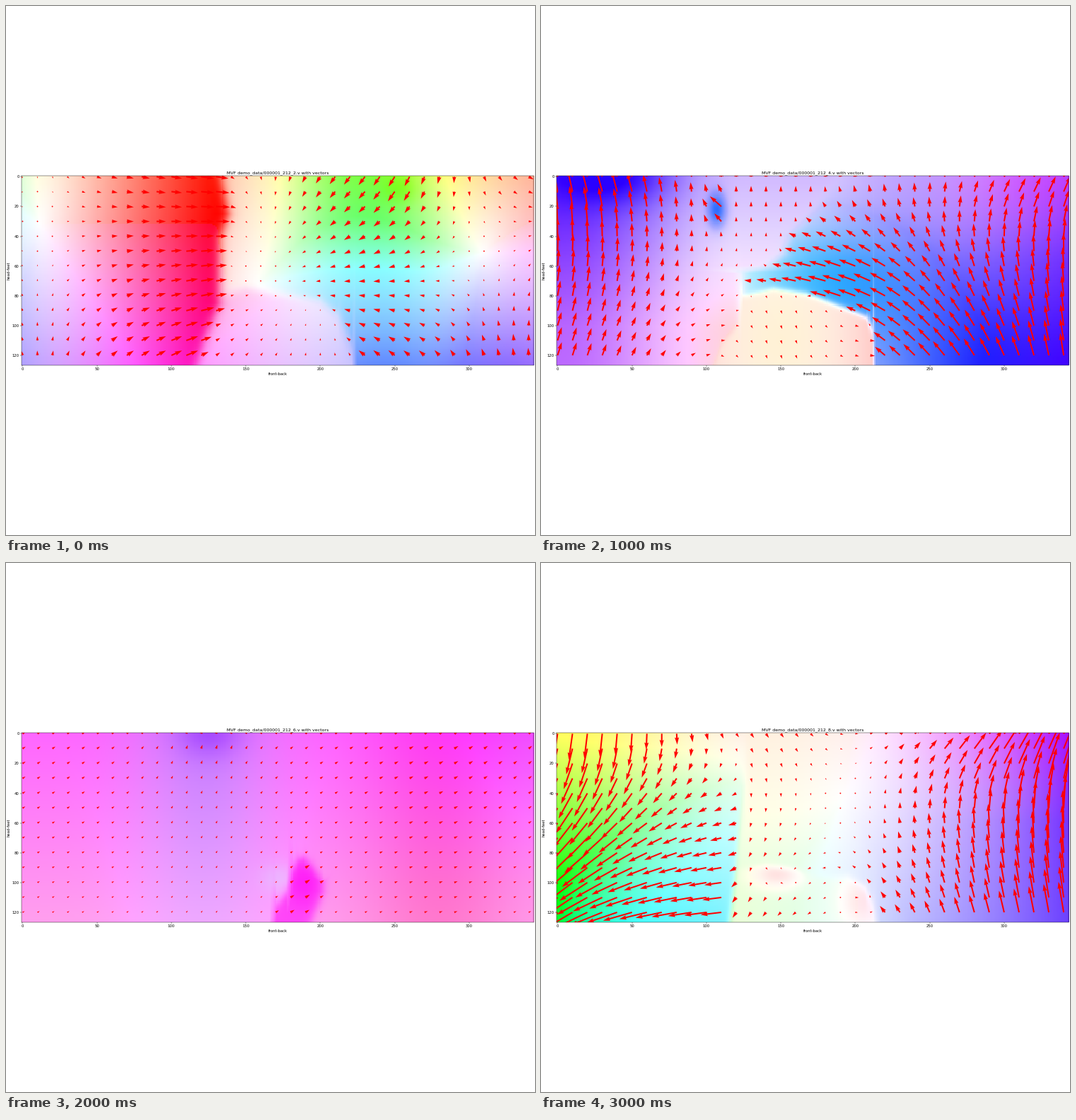
A matplotlib script for the animation above (3.5 s loop, 748 by 748 pixels).

```python
import numpy as np
import matplotlib.pyplot as plt
from matplotlib.animation import FuncAnimation

STAGE, DPI = 748, 37.4
W, H, STEP = 344, 127, 10
LEFT, RIGHT = 22.4, 746.45  # plot edges in pixels
x, y = np.meshgrid(np.arange(W, dtype=float), np.arange(H, dtype=float))
X, Y = x / 100, y / 100

# A flow is a complex field: real part rightward, imaginary part downward.


def ramp(t, a, b):
    """Smooth 0 to 1 as t goes from a to b."""
    s = np.clip((t - a) / (b - a), 0, 1)
    return s * s * (3 - 2 * s)


def bump(cx, cy, sx, sy):
    return np.exp(-((x - cx) / sx) ** 2 - ((y - cy) / sy) ** 2)


def ridge(cx, sx):
    return np.exp(-((x - cx) / sx) ** 2)


def curve(t, *keys):
    return np.interp(t, *zip(*keys))


def lay(under, over, side, soft=1.2):
    """Put one flow over another where side > 0, with a soft seam."""
    gy, gx = np.gradient(side)
    d = side / np.maximum(np.hypot(gx, gy), 1)
    mask = 1 / (1 + np.exp(np.clip(-d / soft, -50, 50)))
    return under + (over - under) * mask


def red_wave():
    left = -.1 + .85 * X + 1j * (.12 - .38 * Y)
    u = .45 - .33 * Y - (.9 - .32 * Y) * np.exp(-((x - 230 - 10 * Y) / 75) ** 2)
    v = .6 * ridge(243, 90) * (1 - Y / .75) - .35 * Y * ramp(x, 260, 343)
    right = u + 1j * v + (-.1 + .2j) * bump(254, 8, 12, 10)
    lobe = .32 - .4 * (X - 1.2) + 1j * (.15 - .29 * Y)
    seam = x - curve(y, (0, 133), (25, 138), (42, 132), (85, 132), (106, 123), (128, 116))
    top = curve(x, (118, 84), (150, 75), (200, 83), (212, 92), (222, 115), (224, 140))
    flow = lay(right, lobe, y - top, 1.6)
    return lay(left, flow, seam, 2)


def red_arch():
    left = (-.22 + .26 * X
            + 1j * (.24 + .14 * X * (1 - Y)) * (1 - ramp(y, 10, 105)))
    right = (-.2 + (.14 - .05 * Y) * (X - 1.4)
             + 1j * (.26 - .16 * (X - 1.4) - .2 * Y))
    push = (.24 + .5 * bump(123, 100, 22, 20) + .65 * bump(215, 118, 20, 25)
            + .42 * bump(255, 118, 35, 18))
    seam = x - curve(y, (0, 145), (15, 141), (42, 134), (72, 124), (90, 123), (106, 130))
    top = curve(x, (121, 93), (130, 94), (140, 84), (155, 78), (170, 76), (190, 78),
                (205, 84), (218, 93), (232, 109), (262, 110), (270, 105), (276, 130))
    bottom = curve(x, (121, 106), (127, 106), (142, 96), (152, 91), (165, 87), (190, 91),
                   (198, 96), (201, 106), (202, 140))
    band = np.minimum.reduce([y - top, bottom - y, x - 121, 276 - x])
    return lay(lay(left, right, seam, 1.5), push * (1 - .18j), band, 1.1)


def violet_lift():
    u = .18 * ramp(y, 30, 110) - .3 * bump(30, 0, 45, 25)
    v = (-.27 * np.clip(1 - Y, 0, 1) - (.66 - .08 * Y) * (1 - ramp(x, 0, 125))
         - .25 * bump(45, 0, 35, 18))
    left = u + 1j * v
    spot = bump(107, 22, 6, 11)
    left = left + spot * (-.65 - .5j - left)
    u = (-.7 * bump(185, 68, 60, 38) - .48 * bump(260, 120, 75, 55)
         + .32 * (1 - ramp(y, 0, 60)) * ramp(x, 230, 320))
    v = -(.28 + .36 * (X - 2) + .25 * (Y - .5) * ramp(x, 200, 300))
    right = u + 1j * v
    lobe = .06 + .4 * (X - 1.5) ** 2 + .15j * bump(150, 110, 45, 60)
    seam = x - curve(y, (0, 188), (26, 170), (40, 156), (52, 152), (60, 143), (64, 124))
    top = curve(x, (100, 140), (110, 113), (122, 100), (124, 80), (145, 75), (167, 78),
                (188, 86), (208, 94), (212, 103), (213, 140))
    return lay(lay(left, right, seam, 1.8), lobe, y - top, 1)


def blue_front():
    warm = bump(135, 28, 60, 30)
    green = -.16 - .05 * Y + .16 * warm + 1j * (.17 + .08 * warm)
    patch = -.42 * bump(120, 2, 35, 30) + 0j
    pink = (.35 - .19 * (X - 1.6) - .08 * Y - .2 * ramp(x, 240, 275)
            - .15 * bump(118, 120, 25, 25)
            + 1j * (-.13 + .08 * bump(150, 100, 40, 30) - .08 * ramp(x, 220, 275)))
    pale = (.08 - .35 * ramp(x, 145, 190) * ramp(y, 90, 125)
            + 1j * (.08 - .2 * ramp(x, 150, 185) * (1 - ramp(y, 95, 125))))
    force = ((.7 + .35 * ramp(y, 0, 90))
             * (1 - (.6 - .4 * Y) * (1 - ramp(x, 250, 345))))
    blue = force * np.exp(1j * np.deg2rad(213))
    rim = curve(x, (93, -5), (98, 5), (108, 11), (118, 14), (135, 12), (150, 6), (154, -5))
    seam = x - curve(y, (0, 155), (15, 151), (36, 147), (43, 135), (52, 130), (70, 125),
                     (90, 122), (128, 116))
    top = curve(x, (128, 128), (135, 117), (150, 112), (165, 105), (178, 95), (186, 87),
                (196, 95), (200, 110), (201, 140))
    front = x - curve(y, (0, 264), (20, 258), (45, 253), (70, 252), (92, 256), (104, 268),
                      (114, 283), (128, 288))
    flow = lay(green, patch, rim - y, 1.6)
    flow = lay(flow, pink, seam, .9)
    flow = lay(flow, pale, y - top, 1.6)
    return lay(flow, blue, front, 1.8)


def magenta_sheet():
    dip = ridge(122, 45)
    u = (.5 - .13 * Y - (.32 - .16 * Y) * dip + .16 * ridge(280, 50)
         - .15 * bump(172, 97, 12, 10))
    v = (-.33 + .13 * Y - (.17 - .06 * Y) * dip - .18 * bump(126, 0, 22, 16)
         - .12 * np.clip(1 - Y, 0, 1) * ramp(x, 180, 343))
    plume = (.72 + .15 * bump(189, 100, 12, 15)) * (.85 - .53j)
    top = curve(x, (166, 140), (170, 116), (178, 106), (181, 90), (185, 84), (189, 83),
                (195, 89), (202, 100))
    side = curve(y, (80, 202), (106, 202), (128, 193))
    return lay(u + 1j * v, plume, np.minimum(y - top, side - x), 1.6)


def violet_ramp():
    base = .5 - .16 * Y
    u = base - (base + .3) * ramp(x, 70 - 20 * Y, 340 - 45 * Y)
    v = -.17 + .24 * Y - (.8 + .07 * Y) * ramp(x, 20 + 40 * Y, 340 + 30 * Y)
    return u + 1j * v


def green_violet():
    u = -.1 - .62 * Y + (.14 + .15 * Y) * X
    v = .62 * np.exp(-(x / (85 - 35 * Y)) ** (2 - .9 * Y))
    left = u + 1j * v
    u = .07 - .16 * Y + .33 * ramp(x, 200, 310) * np.clip(1 - Y / .6, 0, 1)
    reach = np.clip((x - 130) / 215, 0, 1)
    right = u + 1j * (.1 - (.97 - .1 * Y) * reach ** (2 - .5 * Y))
    glow = bump(147, 94, 18, 10)
    lobe = (-.08 + .2 * glow + .18 * bump(206, 112, 18, 22)
            + 1j * (.13 - .16 * (X - 1.2) - .08 * glow))
    seam = x - curve(y, (0, 126), (35, 126), (50, 124), (75, 121), (95, 119), (128, 115))
    top = curve(x, (115, 90), (140, 88), (160, 91), (172, 96), (195, 95), (207, 103),
                (212, 115), (217, 140))
    return lay(left, lay(right, lobe, y - top, 1.4), seam, 1)


def flow_colors(flow):
    """Flow wheel: red right, yellow down, cyan left, violet up."""
    pos = (np.angle(flow) / (2 * np.pi)) % 1 * 54
    stops = [0, 15, 21, 25, 36, 49, 55]
    channels = ([1, 1, 0, 0, 0, 1, 1], [0, 1, 1, 1, 0, 0, 0], [0, 0, 0, 1, 1, 1, 0])
    hue = np.stack([np.interp(pos, stops, c) for c in channels], -1)
    return 1 - np.abs(flow)[..., None] * (1 - hue)


# Each field with its arrow length in pixels at full strength
SCENES = [(red_wave(), 20), (red_arch(), 16), (violet_lift(), 33), (blue_front(), 11),
          (magenta_sheet(), 9), (violet_ramp(), 18), (green_violet(), 60)]
SCENES = [(f / np.maximum(1, np.abs(f)), length) for f, length in SCENES]
IMAGES = [flow_colors(f) for f, _ in SCENES]

plt.rcParams["font.family"] = "DejaVu Sans"
fig = plt.figure(figsize=(STAGE / DPI, STAGE / DPI), dpi=DPI, facecolor="white")
width = (RIGHT - LEFT) / STAGE
height = width * H / W
ax = fig.add_axes([LEFT / STAGE, .5 - height / 2, width, height])
image = ax.imshow(IMAGES[0], interpolation="nearest", aspect="auto")
spots = (slice(None, None, STEP), slice(None, None, STEP))
zero = np.zeros(x[spots].shape)
arrows = ax.quiver(x[spots], y[spots], zero, zero, color="red",
                   scale=1, scale_units="width")
ax.set(xlim=(-.5, W - .5), ylim=(H - .5, -.5), xticks=range(0, 301, 50),
       yticks=range(0, 121, 20), xlabel="front-back", ylabel="head-feet")
title = ax.set_title("")


def draw(i):
    flow, length = SCENES[i]
    image.set_data(IMAGES[i])
    step = flow[spots] * length / (RIGHT - LEFT)
    arrows.set_UVC(step.real, -step.imag)
    title.set_text(f"MVF demo_data/000001_212_{i + 2}.v with vectors")
    return image, arrows, title


anim = FuncAnimation(fig, draw, frames=len(SCENES), interval=500, repeat=True)
plt.show()
```
